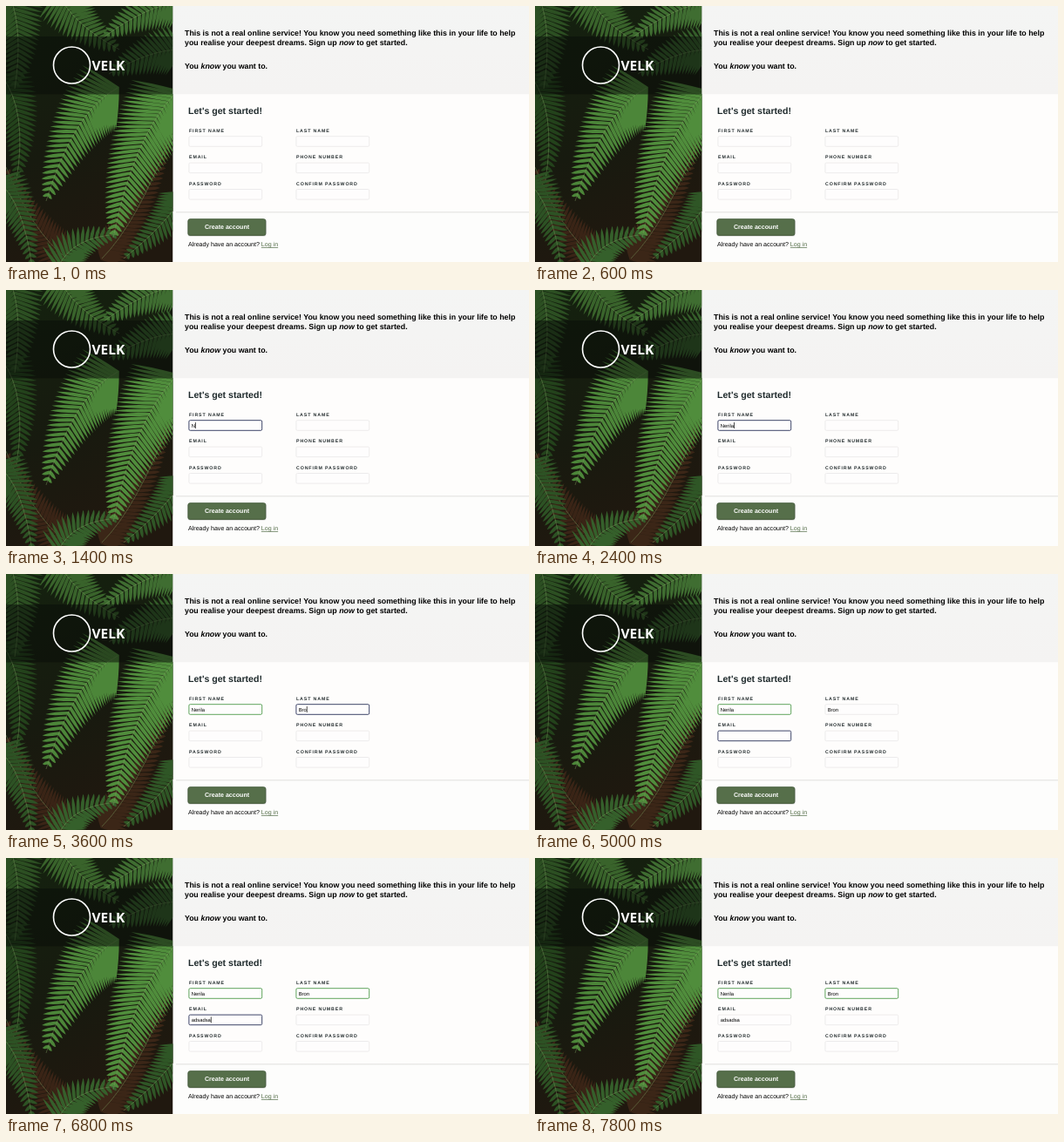
Write an HTML page that moves like this. It is 600 px wide and 294 px high and loops after 8 s.

```html
<!DOCTYPE html>
<html lang="en">
<head>
<meta charset="utf-8">
<title>Sign-up form</title>
<style>
  html, body { margin: 0; width: 600px; height: 294px; overflow: hidden; background: #fefdfc; }
  svg { display: block; font-family: "Liberation Sans", Arial, sans-serif; text-rendering: geometricPrecision; white-space: pre; }
  .lead { font-weight: 700; font-size: 8.84px; }
  .lead tspan { font-style: italic; }
  .brand { font: 700 15.5px "Open Sans", sans-serif; fill: #fff; }
  .label { font-weight: 700; font-size: 5.28px; letter-spacing: .88px; fill: #222b2d; }
  .value { font-size: 5.87px; }
  .box { fill: #fefdfd; stroke: #e9e8e7; stroke-width: .8; }
  .focus { stroke: #3d4468; stroke-width: 1; }
  .valid { stroke: #4f9b4b; stroke-width: .9; }
</style>
</head>
<body>
<svg width="600" height="294" viewBox="0 0 600 294">
  <defs>
    <linearGradient id="soil" x2=".3" y2="1">
      <stop offset="0" stop-color="#14220f"/>
      <stop offset=".6" stop-color="#171a0f"/>
      <stop offset="1" stop-color="#20180f"/>
    </linearGradient>
    <linearGradient id="head" x2="0" y2="1">
      <stop offset="0" stop-color="#f4f5f4"/>
      <stop offset="1" stop-color="#f4f3f2"/>
    </linearGradient>
    <linearGradient id="edge" x2="0" y2="1">
      <stop offset="0" stop-color="#e4e4e2"/>
      <stop offset="1" stop-color="#fdfdfc"/>
    </linearGradient>
    <clipPath id="side"><path d="M0 0H191.5V294H0Z"/></clipPath>
  </defs>

  <g clip-path="url(#side)">
    <path fill="url(#soil)" d="M0 0H192V294H0Z"/>
    <g id="ferns"></g>
    <path fill="#080c08" opacity=".5" d="M0 35H192V101.5H0Z"/>
  </g>
  <circle cx="75.500" cy="68" r="21" fill="none" stroke="#fff" stroke-width="1.600"/>
  <text class="brand" x="98.500" y="74">VELK</text>

  <path fill="url(#head)" d="M191.500 0H600V101.300H191.500Z"/>
  <path fill="#fdfdfc" d="M191.500 236H600V294H191.500Z"/>
  <path fill="url(#edge)" d="M195 236H600V238.500H195Z"/>
  <g class="lead">
    <text x="205" y="34.300">This is not a real online service! You know you need something like this in your life to help</text>
    <text x="205" y="44.600">you realise your deepest dreams. Sign up <tspan>now</tspan> to get started.</text>
    <text x="205" y="72.300">You <tspan>know</tspan> you want to.</text>
  </g>
  <text x="209" y="124" font-size="10.600" font-weight="700" fill="#1f2a2c">Let's get started!</text>
  <g id="form"></g>
  <rect id="caret" width=".7" height="7"/>

  <rect x="208.500" y="245" width="90" height="19.500" rx="2.500" fill="#999" opacity=".5"/>
  <rect x="208.900" y="244.700" width="89" height="18.700" rx="2.200" fill="#566f4a" stroke="#425a39" stroke-width=".9"/>
  <text x="253.500" y="256.200" font-size="7.100" font-weight="700" fill="#fff" text-anchor="middle">Create account</text>
  <text x="209" y="276.200" font-size="7.080">Already have an account? <tspan fill="#566f4a" text-decoration="underline">Log in</tspan></text>
</svg>
<script>
const $ = id => document.getElementById(id);

function add(parent, tag, attrs, text = '') {
  const el = document.createElementNS('http://www.w3.org/2000/svg', tag);
  for (const key in attrs) el.setAttribute(key, attrs[key]);
  el.textContent = text;
  return parent.appendChild(el);
}

// A frond: paired leaflets along a quadratic stem, tapering to the tip.
function frond(fill, width, x0, y0, cx, cy, x1, y1) {
  const count = Math.round(Math.hypot(x1 - x0, y1 - y0) / 5.4);
  let d = '';
  for (let i = 0; i < count; i++) {
    const t = i / count, s = 1 - t;
    const x = s * s * x0 + 2 * s * t * cx + t * t * x1;
    const y = s * s * y0 + 2 * s * t * cy + t * t * y1;
    let ux = s * (cx - x0) + t * (x1 - cx), uy = s * (cy - y0) + t * (y1 - cy);
    const len = Math.hypot(ux, uy);
    ux /= len; uy /= len;
    const reach = width * s ** .6;
    for (const side of [-1, 1]) {
      const dx = (ux * .5 - uy * side * .87) * reach, dy = (uy * .5 + ux * side * .87) * reach;
      const at = (k, f) => `${(x + dx * f + ux * k).toFixed(1)} ${(y + dy * f + uy * k).toFixed(1)}`;
      d += `M${at(-2, 0)}Q${at(-3.2, .6)} ${at(0, 1)}Q${at(3, .6)} ${at(2, 0)}Z`;
    }
  }
  add($('ferns'), 'path', { d, fill });
  add($('ferns'), 'path', { d: `M${x0} ${y0}Q${cx} ${cy} ${x1} ${y1}`, fill: 'none', stroke: '#7fa060', 'stroke-width': .7, opacity: .6 });
}

[
  ['#3a2416', 30, 70, 290, 30, 260, 0, 185],
  ['#3b2617', 28, 110, 290, 150, 250, 188, 150],
  ['#23421b', 34, -5, 80, 25, 120, 12, 200],
  ['#2c4f22', 38, 5, -10, 20, 30, 10, 95],
  ['#39632b', 36, 60, -15, 75, 20, 130, 50],
  ['#3f6d31', 34, 200, -5, 160, 0, 112, 36],
  ['#345e2a', 34, 200, 50, 165, 50, 118, 78],
  ['#2d5224', 32, -10, 200, 20, 225, 30, 300],
  ['#35602b', 30, 60, 300, 75, 265, 130, 262],
  ['#2f5626', 30, 205, 215, 185, 250, 135, 290],
  ['#4c8639', 48, 128, 94, 78, 120, 46, 224],
  ['#508d3c', 54, 196, 98, 146, 150, 123, 266]
].forEach(f => frond(...f));

const fields = ['FIRST NAME', 'LAST NAME', 'EMAIL', 'PHONE NUMBER', 'PASSWORD', 'CONFIRM PASSWORD'].map((label, i) => {
  const x = i % 2 ? 333 : 210, y = 150 + 30.4 * (i >> 1);
  add($('form'), 'text', { class: 'label', x, y: y - 5.2 }, label);
  return {
    x: x + 2.7, y,
    box: add($('form'), 'rect', { x: x - .1, y: y - .3, width: 83.8, height: 11.6, rx: 1.4 }),
    value: add($('form'), 'text', { class: 'value', x: x + 2.7, y: y + 7.7 })
  };
});

// Focus period, time of validation, [time, letters shown] steps and caret pauses.
const entries = [
  { text: 'Nerila', from: 800, to: 3000, valid: 3000, keys: [[1400, 1], [1600, 2], [1800, 3], [2000, 4], [2200, 5], [2400, 6]], hidden: [] },
  { text: 'Bron', from: 3000, to: 5000, valid: 5200, keys: [[3400, 2], [3600, 3], [3800, 4]], hidden: [[4600, 5000]] },
  { text: 'adsadsa', from: 5000, to: 7800, valid: Infinity, keys: [[6400, 1], [6600, 2], [6800, 7]], hidden: [[5000, 5200], [5800, 6400], [7600, 7800]] }
];

function draw(t) {
  $('caret').style.display = 'none';
  fields.forEach(({ x, y, box, value }, i) => {
    const e = entries[i];
    const focused = e && t >= e.from && t < e.to;
    box.setAttribute('class', 'box' + (focused ? ' focus' : e && t >= e.valid ? ' valid' : ''));
    if (!e) return;
    const shown = e.keys.reduce((n, [time, count]) => t >= time ? count : n, 0);
    value.textContent = e.text.slice(0, shown);
    if (focused && !e.hidden.some(([a, b]) => t >= a && t < b)) {
      $('caret').style.display = '';
      $('caret').setAttribute('x', x + (shown && value.getComputedTextLength()));
      $('caret').setAttribute('y', y + 2);
    }
  });
}

const start = performance.now();
(function tick() {
  draw((performance.now() - start) % 8000);
  requestAnimationFrame(tick);
})();
</script>
</body>
</html>
```
